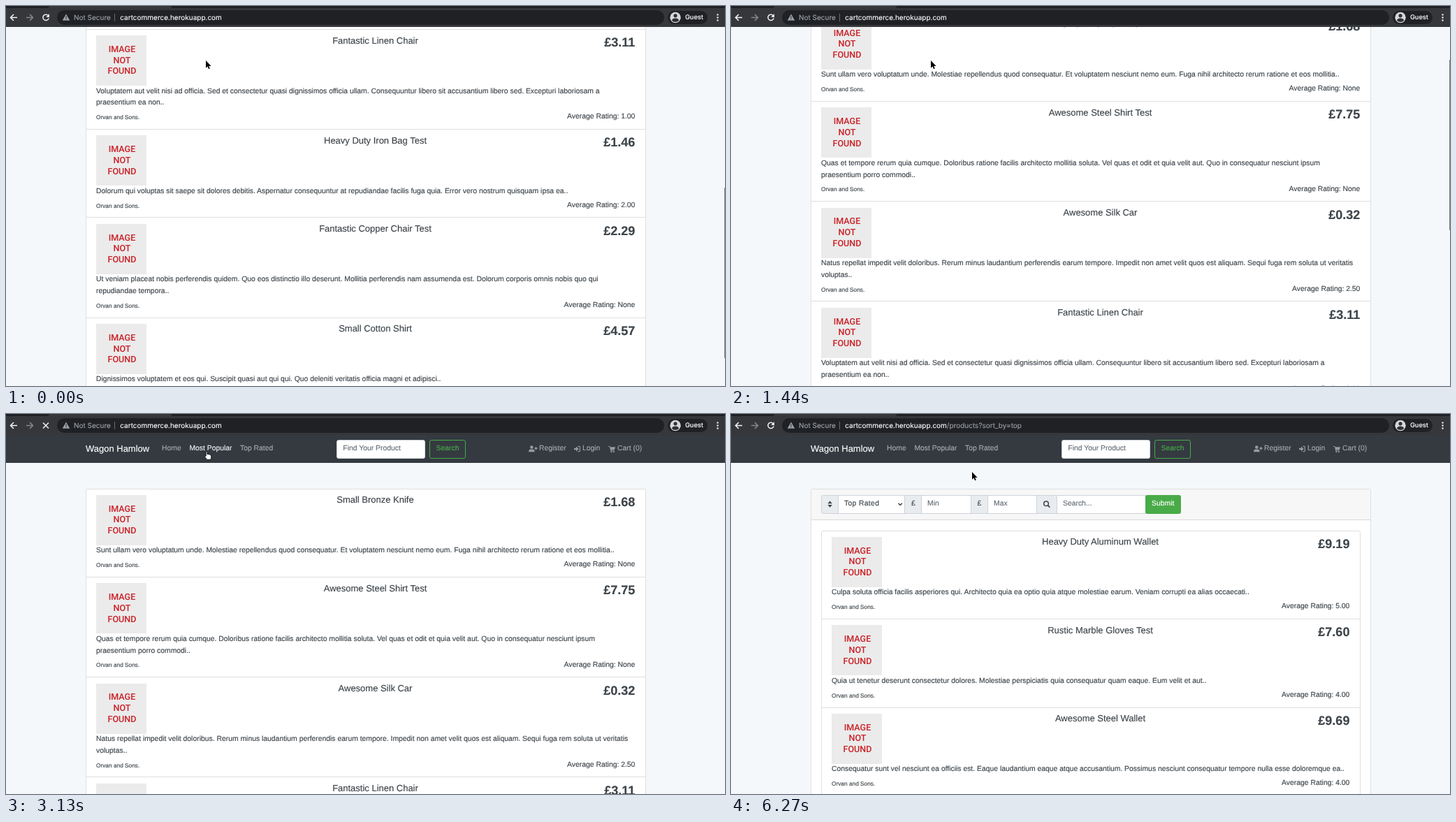
An HTML page that plays this animation: 1029 by 544 pixels, repeating every 6870 ms.

```html
<!DOCTYPE html>
<html lang="en">
<head>
<meta charset="utf-8">
<title>Shop</title>
<style>
html, body { margin: 0; width: 100%; height: 100%; overflow: hidden; background: #f5f8fa; }
body { font-family: "Liberation Sans", Arial, sans-serif; text-rendering: geometricPrecision; color: #3d444a; }
div, svg { position: absolute; box-sizing: border-box; }
#stage { left: 0; top: 0; width: 1029px; height: 544px; overflow: hidden; }
#view { left: 0; top: 30px; width: 1029px; height: 514px; overflow: hidden; background: #f5f8fa; }
#doc, .layer { left: 0; top: 0; width: 1029px; height: 1200px; }
.t { white-space: pre; line-height: 16.63px; -webkit-text-stroke: .15px; }
.ui { font-family: Inter, Roboto, sans-serif; }
.card { background: #fff; border: 1px solid rgba(0,0,0,.125); border-radius: 3px; }
.line { background: rgba(0,0,0,.125); height: 1px; }
.field { background: #fff; border: 1px solid #ced4da; }
.addon { background: #e9ecef; border: 1px solid #ced4da; }
.page { background: #fff; border: 1px solid #dee2e6; }
.thumb { background: #ebebeb; }
.red { font-family: Roboto, "Open Sans", sans-serif; font-weight: 500; color: #cb2026; -webkit-text-stroke: 0; }
.link { color: rgba(255,255,255,.53); }
.link.on { color: rgba(255,255,255,.93); }
.grey { color: #666e76; }
#bar { left: 1028px; width: 1px; height: 244px; background: #77797b; }
</style>
</head>
<body>
<div id="stage">
  <div id="view"><div id="doc"></div></div>
  <div id="bar"></div>
  <div id="chrome" style="left:0;top:0;width:1029px;height:30px">
    <svg width="1029" height="30">
      <path fill="#36373a" d="M0 0h1029v30H0z"/>
      <path fill="#1f2023" d="M0 0h62q0 3-4 3H0zM236 0h793v3H240q-4 0-4-3z"/>
      <rect x="73" y="6" width="869" height="21" rx="10.5" fill="#202124"/>
      <rect x="947" y="7" width="57" height="19" rx="9.5" fill="#202124"/>
      <g fill="none" stroke="#f1f3f4" stroke-width="1.5">
        <path d="M16 16.500H7M11 12l-4.500 4.500 4.500 4.500"/>
        <path stroke="#86888b" d="M29 16.500h9M34 12l4.500 4.500-4.500 4.500"/>
        <path id="stop" d="M53 12.500l8 8M61 12.500l-8 8"/>
        <g id="reload"><path d="M60.300 13.600A4.200 4.200 0 1 0 61.200 17.300"/><path fill="#f1f3f4" stroke="none" d="M62 11.300v4.700h-4.700z"/></g>
      </g>
      <path fill="#9aa0a6" d="M86 11.500l5.300 9.300H80.700z"/>
      <path stroke="#202124" d="M86 14.500v3M86 18.400v1.200"/>
      <path stroke="#6b6d70" d="M155.500 11v11"/>
      <circle cx="958" cy="16.500" r="7.700" fill="#d5d7da"/>
      <g fill="#303134"><circle cx="958" cy="13.800" r="2.600"/><path d="M952.800 20.500q1.200-3 5.200-3t5.200 3q-2 2.500-5.200 2.500t-5.200-2.500z"/></g>
      <g fill="#e8eaed"><circle cx="1018.500" cy="12.500" r="1.200"/><circle cx="1018.500" cy="16.500" r="1.200"/><circle cx="1018.500" cy="20.500" r="1.200"/></g>
    </svg>
  </div>
  <svg id="cursor" width="24" height="24" viewBox="-5 -5 24 24">
    <path id="arrow" d="M0 0V10.800L2.500 8.500 4.100 12.200 5.800 11.500 4.200 7.900H7.600Z" fill="#000" stroke="#fff" stroke-width="1" stroke-linejoin="round" paint-order="stroke"/>
    <path id="hand" d="M-.9 7.200V1Q-.9 0 0 0T1 1V4.600Q2.300 3.700 3 4.900 4.500 4.300 5 5.500 6.800 5.200 6.800 7V9Q6.600 10.600 5.800 12.300H.6Q-.6 10.600-2.400 8.200-2.700 6.700-.9 7.200Z" fill="#fff" stroke="#111" stroke-width="1"/>
  </svg>
</div>
<script>
const $ = id => document.getElementById(id);
const LOOP = 6870, BODY = 10.39, LINE = 16.63, MAKER = 'Orvan and Sons.';

function add(parent, cls, x, y, w, h, css = '') {
  const el = document.createElement('div');
  el.className = cls;
  el.style.cssText = `left:${x}px;top:${y}px;width:${w}px;height:${h}px;${css}`;
  return parent.appendChild(el);
}

// Text whose first line is centred on cy; x is the left, middle or right edge.
function text(parent, str, x, cy, size = BODY, cls = '', align = 'left') {
  const w = 900, shift = { left: 0, center: w / 2, right: w }[align];
  const el = add(parent, 't ' + cls, x - shift, cy - LINE / 2, w, LINE, `font-size:${size}px;text-align:${align}`);
  el.textContent = str;
  return el;
}

const layer = () => add($('doc'), 'layer', 0, 0, 1029, 1200);

function icons(parent, body) {
  parent.insertAdjacentHTML('beforeend', `<svg width="1029" height="200" style="left:0;top:0">${body}</svg>`);
}

// Stacks products downwards.
function products(parent, items, left, right, top) {
  const card = add(parent, 'card', left, top, right - left, 10);
  let y = top;
  items.forEach(([name, price, rating, blurb], i) => {
    if (i) add(parent, 'line', left + 1, y, right - left - 2, 1);
    const x = left + 15, end = right - 15.1;
    add(parent, 'thumb', x, y + 9.4, 72, 72);
    ['IMAGE', 'NOT', 'FOUND'].forEach((word, k) =>
      text(parent, word, x + 37, y + 30.6 + k * 15.7, 12.6, 'red', 'center'));
    text(parent, name, 528.5, y + 17.2, 12.99, '', 'center');
    text(parent, price, end, y + 19.8, 18.04, '', 'right').style.fontWeight = 'bold';
    text(parent, blurb, x, y + 90.2);
    y += (blurb.split('\n').length - 1) * LINE;
    text(parent, MAKER, x, y + 110.1, 8.31);
    text(parent, 'Average Rating: ' + rating, end, y + 110.2, BODY, '', 'right');
    y += 126.5;
  });
  card.style.height = y - top + 1 + 'px';
}

const cotton = ['Small Cotton Shirt', '£4.57', 'None', 'Dignissimos voluptatem et eos qui. Suscipit quasi aut qui qui. Quo deleniti veritatis officia magni et adipisci..'];
const homeItems = [
  ['Small Bronze Knife', '£1.68', 'None', 'Sunt ullam vero voluptatum unde. Molestiae repellendus quod consequatur. Et voluptatem nesciunt nemo eum. Fuga nihil architecto rerum ratione et eos mollitia..'],
  ['Awesome Steel Shirt Test', '£7.75', 'None', 'Quas et tempore rerum quia cumque. Doloribus ratione facilis architecto mollitia soluta. Vel quas et odit et quia velit aut. Quo in consequatur nesciunt ipsum\npraesentium porro commodi..'],
  ['Awesome Silk Car', '£0.32', '2.50', 'Natus repellat impedit velit doloribus. Rerum minus laudantium perferendis earum tempore. Impedit non amet velit quos est aliquam. Sequi fuga rem soluta ut veritatis\nvoluptas..'],
  ['Fantastic Linen Chair', '£3.11', '1.00', 'Voluptatem aut velit nisi ad officia. Sed et consectetur quasi dignissimos officia ullam. Consequuntur libero sit accusantium libero sed. Excepturi laboriosam a\npraesentium ea non..'],
  ['Heavy Duty Iron Bag Test', '£1.46', '2.00', 'Dolorum qui voluptas sit saepe sit dolores debitis. Aspernatur consequuntur at repudiandae facilis fuga quia. Error vero nostrum quisquam ipsa ea..'],
  ['Fantastic Copper Chair Test', '£2.29', 'None', 'Ut veniam placeat nobis perferendis quidem. Quo eos distinctio illo deserunt. Mollitia perferendis nam assumenda est. Dolorum corporis omnis nobis quo qui\nrepudiandae tempora..'],
  cotton
];
const popularItems = [
  ['Incredible Rubber Bottle Test', '£3.27', 'None', 'Totam nihil quia consectetur consequatur. Officia et est mollitia ut. Necessitatibus ea est fugit natus cupiditate. Est culpa fugiat eos placeat rerum..'],
  ['Small Aluminum Wallet', '£6.56', 'None', 'Sint sit tempore omnis enim laboriosam et est. Atque corporis ullam vero perspiciatis dolor aspernatur. Unde quia aut ea blanditiis aut et. Ut excepturi qui beatae\naut asperiores..'],
  cotton
];
const ratedItems = [
  ['Heavy Duty Aluminum Wallet', '£9.19', '5.00', 'Culpa soluta officia facilis asperiores qui. Architecto quia ea optio quia atque molestiae earum. Veniam corrupti ea alias occaecati..'],
  ['Rustic Marble Gloves Test', '£7.60', '4.00', 'Quia ut tenetur deserunt consectetur dolores. Molestiae perspiciatis quia consequatur quam eaque. Eum velit et aut..'],
  ['Awesome Steel Wallet', '£9.69', '4.00', 'Consequatur sunt vel nesciunt ea officiis est. Eaque laudantium eaque atque accusantium. Possimus nesciunt consequatur tempore nulla esse doloremque ea..']
];

function homePage() {
  const p = layer(), blue = '#147efb';
  products(p, homeItems, 114, 915.5, 106.5);
  const edges = [114, 136, 160, 184, 208, 231, 255, 279, 301];
  [...'‹123456›'].forEach((ch, i) => {
    const x = edges[i], w = edges[i + 1] - x, on = i === 1;
    const round = i === 0 ? '3px 0 0 3px' : i === 7 ? '0 3px 3px 0' : '0';
    add(p, 'page', x, 1075.2, w + (i < 7 ? 1 : 0), 27, `border-radius:${round};` + (on ? `z-index:1;background:${blue};border-color:${blue}` : ''));
    const label = text(p, ch, x + w / 2, 1088.7, BODY, i ? '' : 'grey', 'center');
    label.style.zIndex = 2;
    if (i) label.style.color = on ? '#fff' : blue;
  });
  text(p, 'Wagon Hamlow © 2018', 514.7, 1132, BODY, 'grey', 'center');
  return p;
}

function sortedPage(order, items) {
  const p = layer();
  add(p, 'card', 114, 106.5, 801.5, 600);
  add(p, '', 115, 107.5, 799.5, 44, 'background:#f7f7f7');
  add(p, 'line', 115, 151, 799.5, 1);
  const edges = [129, 153, 248, 272, 343, 367, 437, 466, 593];
  edges.slice(0, 8).forEach((x, i) =>
    add(p, i % 2 ? 'field' : 'addon', x, 116, edges[i + 1] - x + 1, 27, i ? '' : 'border-radius:3px 0 0 3px'));
  add(p, '', 593, 116, 50.5, 27, 'background:#49ab48;border-radius:3px');
  text(p, order, 162, 129.3).style.letterSpacing = '.33px';
  text(p, '£', 261, 129.3, BODY, '', 'center');
  text(p, '£', 355.5, 129.3, BODY, '', 'center');
  text(p, 'Min', 281, 129.3, BODY, 'grey');
  text(p, 'Max', 376, 129.3, BODY, 'grey');
  text(p, 'Search...', 475, 129.3, BODY, 'grey');
  text(p, 'Submit', 618.2, 129.3, BODY, '', 'center').style.color = '#fff';
  icons(p, `<path fill="#3d444a" d="M138.300 128.200h6.600l-3.300-3.700zM138.300 130h6.600l-3.300 3.700z"/>
    <g fill="none" stroke="#3d444a" stroke-width="1.500"><path d="M239.500 127.700l2.700 2.800 2.700-2.800"/>
    <circle cx="451" cy="128.300" r="3.300"/><path d="M453.300 130.700l3 3" stroke-width="1.800"/></g>`);
  products(p, items, 129, 900.5, 166.5);
  return p;
}

function navBar() {
  const p = layer();
  add(p, '', 0, 30, 1029, 40, 'background:#343a40');
  text(p, 'Wagon Hamlow', 114, 50, 12.99).style.color = '#fff';
  text(p, 'Home', 223, 50, BODY, 'link');
  const links = [text(p, 'Most Popular', 262.4, 50, BODY, 'link'), text(p, 'Top Rated', 335, 50, BODY, 'link')];
  add(p, 'field', 473, 37, 127, 27, 'border-radius:3px');
  text(p, 'Find Your Product', 482.3, 50.5, BODY, 'grey');
  add(p, '', 606, 37, 52, 27, 'border:1px solid #49ab48;border-radius:3px');
  text(p, 'Search', 632, 50, BODY, '', 'center').style.color = '#49ab48';
  text(p, 'Register', 763, 50, BODY, 'link');
  text(p, 'Login', 825, 50, BODY, 'link');
  text(p, 'Cart (0)', 875, 50, BODY, 'link');
  icons(p, `<g fill="#989b9e"><circle cx="752.300" cy="47.500" r="2.300"/><path d="M748 54.300q0-3.700 2.800-3.700h3q2.800 0 2.800 3.700z"/>
    <path d="M757.800 47h1.300v1.600h1.500v1.300h-1.500v1.600h-1.300v-1.600h-1.500v-1.300h1.500zM813 48.700h3v-2.200l3.600 3.500-3.600 3.500v-2.200h-3z"/>
    <path d="M862 46h2.300l.4 1.300h7.300l-1.200 4.200h-4.600l.2 1h4.300v.9h-5.200l-1.600-6.500h-1.900z"/>
    <circle cx="866.300" cy="54.200" r="1"/><circle cx="870" cy="54.200" r="1"/></g>
    <path fill="none" stroke="#989b9e" stroke-width="1.200" d="M818.500 46.300h1.700q1.200 0 1.200 1.200v5q0 1.200-1.200 1.200h-1.700"/>`);
  return links;
}

const pages = [homePage(), sortedPage('Most Popular', popularItems), sortedPage('Top Rated', ratedItems)];
const links = navBar();
const bar = $('chrome');
text(bar, 'Not Secure', 97, 17.4, 10, 'ui').style.color = '#9aa0a6';
const url = text(bar, 'cartcommerce.herokuapp.com', 163.3, 17.4, 10, 'ui');
url.style.color = '#fff';
const path = document.createElement('span');
path.style.color = '#9aa0a6';
url.append(path);
const guest = text(bar, 'Guest', 972, 17.4, 9.2, 'ui');
guest.style.cssText += 'color:#f1f3f4;font-weight:500';

// Each track: [start in ms, value...]
const scroll = [[0, 486.5], [150, 580], [390, 611], [570, 612.2], [1440, 97], [1590, -9], [1890, -2], [2180, 0]];
const thumb = [[0, 1], [870, .5], [1080, 0], [1440, 1], [2390, 0]];
const shown = [[0, 0], [3580, 1], [6270, 2]];
const hover = [[0, -1], [2390, 0], [3580, -1], [5080, 1], [6270, -1]];
const busy = [[0, 0], [3130, 1], [3430, 0], [5670, 1], [6120, 0]];
const route = [[0, ''], [3280, '/products?sort_by=pop'], [5970, '/products?sort_by=top']];
const pointer = [
  [0, 'arrow', 286, 78], [1890, 'arrow', 282, 79], [2180, 'arrow', 284, 72], [2390, 'hand', 286.5, 53],
  [3280, 'arrow', 285, 53], [3430, 'arrow', 293, 63], [3580, 'arrow', 312, 80], [3730, 'arrow', 314, 82],
  [4930, 'arrow', 340.5, 62], [5080, 'hand', 357, 51], [5220, 'hand', 357.5, 51.5],
  [5820, 'arrow', 356, 51], [5970, 'arrow', 351, 63], [6120, 'arrow', 347, 75], [6270, 'arrow', 345, 82.5]
];
const at = (track, t) => track.findLast(step => step[0] <= t).slice(1);
const show = (el, on) => { el.style.display = on ? '' : 'none'; };

function render(t) {
  const [y] = at(scroll, t), [page] = at(shown, t), [lit] = at(hover, t), [wait] = at(busy, t);
  const [kind, cx, cy] = at(pointer, t), [tail] = at(route, t);
  $('doc').style.top = -30 - y + 'px';
  $('bar').style.top = 32 + .469 * Math.max(0, y) + 'px';
  $('bar').style.opacity = at(thumb, t)[0];
  pages.forEach((p, i) => show(p, i === page));
  links.forEach((l, i) => l.classList.toggle('on', i === lit));
  show($('stop'), wait);
  show($('reload'), !wait);
  if (path.textContent !== tail) path.textContent = tail;
  show($('arrow'), kind === 'arrow');
  show($('hand'), kind === 'hand');
  $('cursor').style.left = cx - 5 + 'px';
  $('cursor').style.top = cy - 5 + 'px';
}

const start = performance.now();
function tick() {
  render((performance.now() - start) % LOOP);
  requestAnimationFrame(tick);
}
tick();
</script>
</body>
</html>
```
